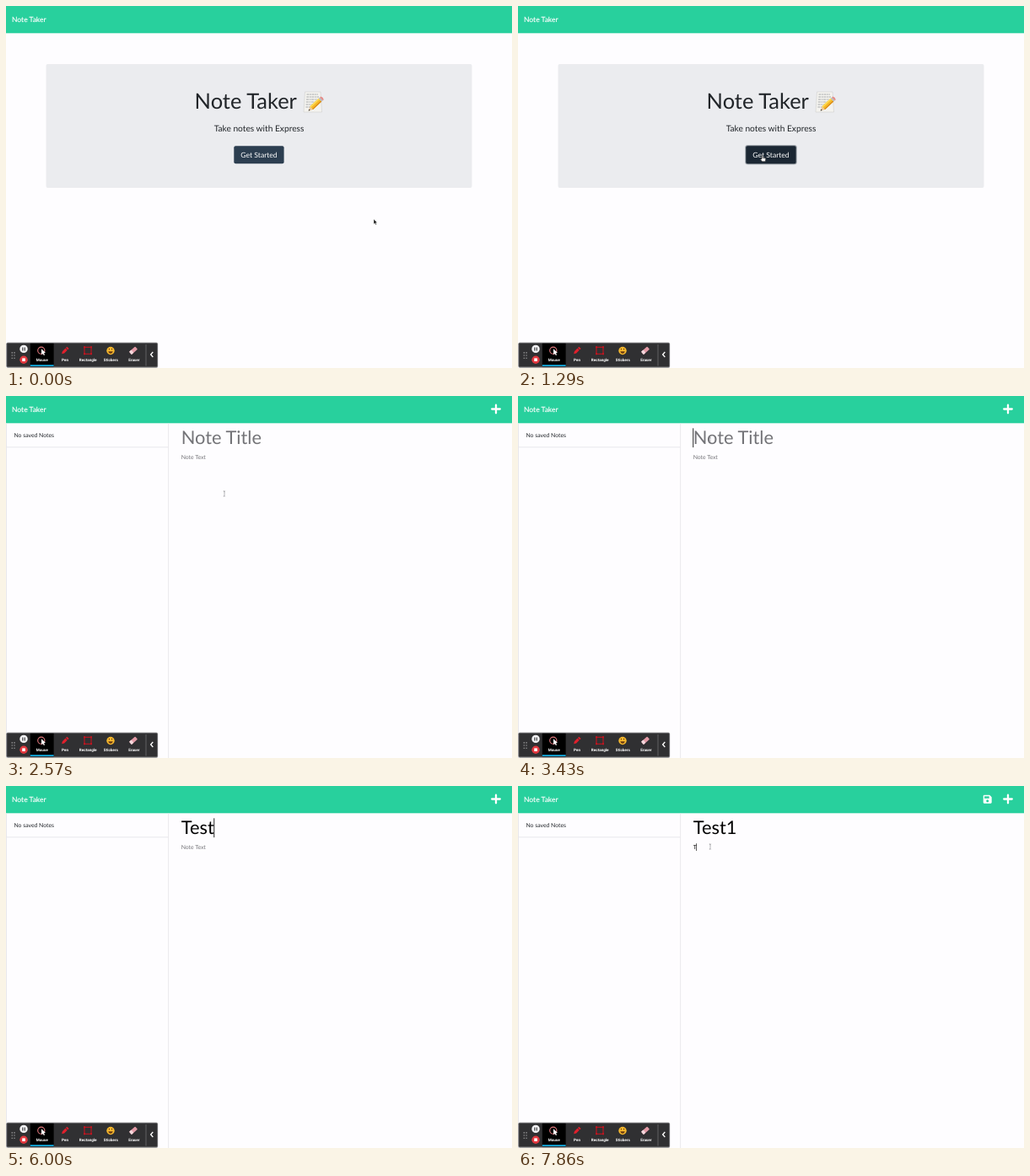
An HTML page that plays this animation: 600 px wide and 430 px high, repeating every 8 s.

```html
<!DOCTYPE html>
<html lang="en">
<head>
<meta charset="utf-8">
<title>Note Taker</title>
<style>
  html, body { margin: 0; width: 100%; height: 100%; overflow: hidden; background: #fefdff; }
  svg { display: block; width: 600px; height: 430px; font-family: Lato, sans-serif; text-rendering: geometricPrecision; }
  .light { fill: #fff; }
  .mid { text-anchor: middle; }
  .rule { fill: none; stroke: #e4e3e8; stroke-width: .8; }
  .hint { fill: #747478; }
  .big { font-size: 21.84px; }
  .small { font-size: 6.83px; }
  .caret { fill: #111; }
  #tools text { font: 700 4.6px Roboto, sans-serif; fill: #fff; text-anchor: middle; }
</style>
</head>
<body>
<svg viewBox="0 0 600 430">
  <rect width="600" height="430" fill="#fefdff"/>
  <rect width="600" height="32.3" fill="#28d09d"/>
  <text x="7" y="19" font-size="8.53" class="light" stroke="#fff" stroke-width=".15">Note Taker</text>

  <g id="home">
    <rect x="47.5" y="69" width="505" height="147" rx="2" fill="#ebecef"/>
    <text x="223.6" y="122.4" font-size="25.48" fill="#212529">Note Taker</text>
    <g id="memo">
      <path d="M354.5 102H373L374.5 126H353Z" fill="#f4f3ef" stroke="#cfcfcd" stroke-width=".6"/>
      <path d="M356.5 105H370M356.3 108H371M356 111H369M355.8 114H368M355.6 117H364M355.4 120H361" stroke="#94979a" stroke-width=".8" stroke-dasharray="3 .7 1.8 .6"/>
      <g transform="translate(358.6 124.6) rotate(-43)">
        <path d="M0 0L5-2.6V2.6Z" fill="#ecc898"/>
        <path d="M0 0L2-1V1Z" fill="#333"/>
        <path d="M5-2.6H19V2.6H5Z" fill="#f6b928"/>
        <path d="M5-2.6H19V-1H5Z" fill="#ffdc55"/>
        <path d="M5 1.3H19V2.6H5Z" fill="#d8891b"/>
        <path d="M19-2.6H21V2.6H19Z" fill="#b9bcc0"/>
        <path d="M21-2.6H22.4Q24 0 22.4 2.6H21Z" fill="#e58a86"/>
      </g>
    </g>
    <text x="300" y="149.2" font-size="10.2" fill="#212529" class="mid">Take notes with Express</text>
    <rect id="ring" x="269.4" y="165.2" width="61.2" height="23" rx="2.6" fill="#8d949b"/>
    <rect id="button" x="270.3" y="166.2" width="59.3" height="21" rx="2" fill="#2c3e50"/>
    <text x="300" y="179.9" font-size="8.6" class="light mid">Get Started</text>
  </g>

  <g id="notes">
    <path class="rule" d="M.5 32.5V430M192.6 32.5V430M.5 60.8H192.6"/>
    <text x="9.5" y="49.2" class="small" fill="#212529">No saved Notes</text>
    <path d="M581 10.7V20.3M576.2 15.5H585.8" stroke="#fff" stroke-width="2.3" stroke-linecap="round"/>
    <path id="save" class="light" fill-rule="evenodd" d="M552.8 10.8H559.3L561.7 13.2V19.6Q561.7 20.7 560.6 20.7H552.8Q551.7 20.7 551.7 19.6V11.9Q551.7 10.8 552.8 10.8ZM553.1 12.2V14.8H558.7V12.2ZM556.7 16.2A1.5 1.5 0 1 0 556.7 19.2A1.5 1.5 0 1 0 556.7 16.2Z"/>
    <text id="title" x="207.7" y="57.4" class="big"></text>
    <text id="body" x="207.7" y="75.3" class="small"></text>
    <rect id="titleCaret" class="caret" y="38.3" width=".9" height="22.8"/>
    <rect id="bodyCaret" class="caret" y="68.2" width=".7" height="8.8"/>
  </g>

  <g id="tools">
    <rect x=".3" y="399.6" width="180" height="30.4" rx="2" fill="#000" opacity=".25"/>
    <rect x="1" y="400.4" width="178.4" height="28.4" rx="1" fill="#303032" stroke="#59595b" stroke-width=".8"/>
    <path d="M7.2 411.3V419M10 411.3V419" stroke="#c8c8c8" stroke-width="1.1" stroke-dasharray="1.1 2.1"/>
    <circle cx="21" cy="407.4" r="4.7" fill="#f2f2f4"/>
    <path d="M19.8 405.4V409.4M22.2 405.4V409.4" stroke="#333" stroke-width="1.1"/>
    <circle cx="21" cy="420.2" r="4.7" fill="#e2383f"/>
    <rect x="19.2" y="418.4" width="3.6" height="3.6" class="light"/>
    <rect x="28.8" y="400.8" width="27.8" height="27.6" fill="#000"/>
    <rect x="28.8" y="426.2" width="27.8" height="1.8" fill="#12a9dc"/>
    <circle cx="41.8" cy="409.2" r="4.1" fill="none" stroke="#e0777c" stroke-width="1.1"/>
    <path class="light" d="M42 407.3V414.3L43.7 412.8L44.8 415L46 414.4L44.9 412.3L47 412Z"/>
    <g transform="translate(70 409.3) rotate(-45)" fill="#e0202c">
      <path d="M-5.5 0L-2.8-1.6H2.3V1.6H-2.8ZM3-1.6H5V1.6H3Z"/>
    </g>
    <rect x="93" y="405.3" width="8" height="8" fill="none" stroke="#c3141f" stroke-width="1.1"/>
    <path d="M92 404.3h2v2h-2zM100 404.3h2v2h-2zM92 412.3h2v2h-2zM100 412.3h2v2h-2z" fill="#c3141f"/>
    <circle cx="124" cy="409.5" r="4.7" fill="#f7b92d"/>
    <path d="M121.2 410.2H126.8Q126.3 413 124 413T121.2 410.2Z" fill="#6b3b12"/>
    <path d="M122.4 406.8V408.4M125.6 406.8V408.4" stroke="#6b3b12" stroke-width="1"/>
    <g transform="translate(151 409.2) rotate(-42)">
      <rect x="-4.8" y="-2.2" width="9.6" height="4.4" rx=".8" fill="#e39aa6"/>
      <rect x="-4.8" y="-2.2" width="3.4" height="4.4" rx=".8" fill="#f3d9dd"/>
    </g>
    <text x="42.7" y="421.5">Mouse</text>
    <text x="70" y="421.5">Pen</text>
    <text x="97.2" y="421.5">Rectangle</text>
    <text x="124.3" y="421.5">Stickers</text>
    <text x="151.8" y="421.5">Eraser</text>
    <path d="M166 402V427.5" stroke="#77777a" stroke-width=".7"/>
    <path d="M174.3 411L171.6 414L174.3 417" fill="none" stroke="#fff" stroke-width="1.3"/>
  </g>

  <g id="mouse">
    <path id="arrow" d="M0 0V6.2L1.4 5L2.3 7.1L3.4 6.6L2.5 4.6H4.2Z" fill="#111" stroke="#fff" stroke-width=".5"/>
    <path id="hand" d="M-1 .6Q-.4-.2.2.6V2.6L3.2 3.2Q4 3.5 3.8 4.4L3.2 7.2H-.4L-2.6 4.6Q-2.4 3.7-1 4.4Z" fill="#fff" stroke="#333" stroke-width=".7" stroke-linejoin="round"/>
    <path id="beam" d="M-1.1-3.2L0-2.7L1.1-3.2M0-2.7V2.7M-1.1 3.2L0 2.7L1.1 3.2" fill="none" stroke="#77777b" stroke-width=".8" stroke-dasharray="1.6 .7"/>
  </g>
</svg>
<script>
const LOOP = 8000, FPS = 7;
const $ = id => document.getElementById(id);
const show = (id, on) => $(id).style.display = on ? '' : 'none';
const within = (n, ...spans) => spans.some(([a, b]) => n >= a && n < b);

// Ticks of 1/7 s: [start, end, x0, y0, x1, y1]
const moves = [
  [0, 8, 436, 253, 290, 177.6],
  [14, 22, 290, 180, 228, 52],
  [46, 49, 228, 52, 228, 72]
];
const titles = [[29, 'T'], [32, 'Te'], [34, 'Tes'], [36, 'Test'], [43, 'Test1']];

function mouseAt(n) {
  const [a, b, x0, y0, x1, y1] = moves.filter(m => n >= m[0]).pop();
  const p = Math.min(1, (n - a) / (b - a));
  const e = p * p * (3 - 2 * p);
  return [x0 + (x1 - x0) * e, y0 + (y1 - y0) * e];
}

function field(id, value, hint) {
  const el = $(id), text = value || hint;
  if (el.textContent !== text) el.textContent = text;
  el.classList.toggle('hint', !value);
  $(id + 'Caret').setAttribute('x', 207.3 + (value ? el.getComputedTextLength() : 0));
}

function draw(n) {
  const home = n < 10;
  show('home', home);
  show('notes', !home);
  show('ring', n === 9);
  $('button').setAttribute('fill', n >= 7 ? '#1b2733' : '#2c3e50');

  if (!home) {
    const typed = titles.filter(k => n >= k[0]).pop();
    field('title', typed ? typed[1] : '', 'Note Title');
    field('body', n >= 55 ? 'T' : '', 'Note Text');
    show('titleCaret', within(n, [23, 26], [29, 39], [42, 46]));
    show('bodyCaret', within(n, [49, 52], [55, 56]));
    show('save', n >= 55);
  }

  const [x, y] = mouseAt(n);
  $('mouse').setAttribute('transform', `translate(${x} ${y})`);
  show('arrow', n < 7);
  show('hand', within(n, [7, 15]));
  show('beam', within(n, [15, 29], [47, 56]));
}

let last = -1;
function tick() {
  const t = performance.now() % LOOP;
  // small lead absorbs rounded timestamps
  const n = Math.min(55, Math.floor(t * FPS / 1000 + .03));
  if (n !== last) draw(last = n);
  requestAnimationFrame(tick);
}
tick();
</script>
</body>
</html>
```
